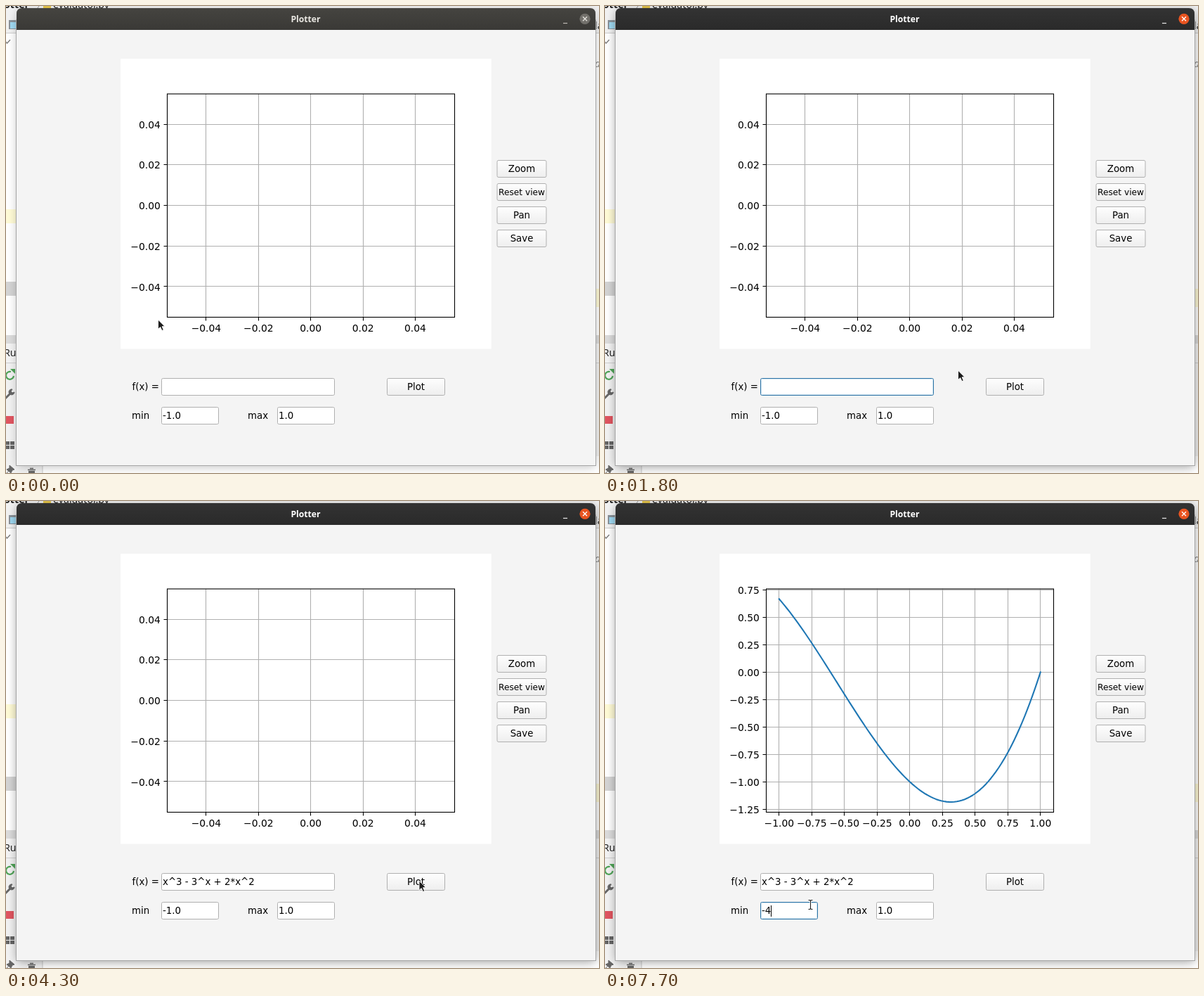
An HTML page for the animation above (8000 ms loop, 844 by 664 pixels).

```html
<!DOCTYPE html>
<html lang="en">
<head>
<meta charset="utf-8">
<title>Plotter</title>
<style>
  html, body { margin: 0; width: 100%; height: 100%; overflow: hidden; background: #f2f2f2; }
  svg { display: block; }
  text { font-family: "DejaVu Sans", sans-serif; font-size: 13.33px; fill: #000; white-space: pre; }
  .tick { font-size: 13.89px; }
  .ide { font-family: "Noto Sans", sans-serif; font-size: 14.2px; fill: #222; }
  .title { font-family: "Noto Sans", sans-serif; font-size: 12.2px; font-weight: bold; }
</style>
</head>
<body>
<svg id="stage" width="844" height="664" viewBox="0 0 844 664">
  <defs>
    <linearGradient id="btn" x2="0" y2="1">
      <stop stop-color="#fefefe"/><stop offset="1" stop-color="#eeeeee"/>
    </linearGradient>
    <linearGradient id="barIdle" x2="0" y2="1">
      <stop stop-color="#454440"/><stop offset="1" stop-color="#3a3936"/>
    </linearGradient>
    <linearGradient id="barActive" x2="0" y2="1">
      <stop stop-color="#333333"/><stop offset="1" stop-color="#2a2a2a"/>
    </linearGradient>
    <filter id="soft" x="-10%" y="-10%" width="120%" height="120%">
      <feGaussianBlur stdDeviation="7"/>
    </filter>
    <clipPath id="axes"><rect x="229" y="125" width="410" height="318"/></clipPath>
  </defs>
</svg>
<script>
const LOOP = 8000, STEP = 100;
const FORMULA = 'x^3 - 3^x + 2*x^2';
const stage = document.getElementById('stage');

function add(parent, tag, attrs, content) {
  const el = document.createElementNS('http://www.w3.org/2000/svg', tag);
  set(el, attrs);
  if (content !== undefined) el.textContent = content;
  parent.appendChild(el);
  return el;
}
function set(el, attrs) {
  for (const key in attrs) el.setAttribute(key, attrs[key]);
}
const group = (parent = stage) => add(parent, 'g', {});
const rect = (p, x, y, width, height, fill, more) =>
  add(p, 'rect', { x, y, width, height, fill, ...more });
const path = (p, d, stroke, more) => add(p, 'path', { d, stroke, fill: 'none', ...more });
const label = (p, x, y, str, more) => add(p, 'text', { x, y, ...more }, str);
const show = (el, on) => el.setAttribute('visibility', on ? 'visible' : 'hidden');
const snap = v => Math.floor(v) + 0.5;

// Editor showing around the window
function drawDesktop() {
  const g = group();
  rect(g, 0, 0, 844, 664, '#f2f2f2');
  label(g, 33, 3, 'plotter', { class: 'ide', 'text-anchor': 'end', 'font-weight': 'bold' });
  path(g, 'M43 -6l4 6-4 6', '#999');
  rect(g, 53, -8, 11, 11, '#e8c74a');
  label(g, 67, 3, 'evaluator.py', { class: 'ide' });
  rect(g, 4, 20, 14, 13, '#8a9299');
  rect(g, 6, 23, 12, 9, '#9fd9f2');
  rect(g, 0, 38, 844, 1, '#cfcfcf');
  rect(g, 0, 39, 844, 429, '#fff');
  path(g, 'M-1 50l2.5 3 4.5-5', '#777', { 'stroke-width': 1.3 });
  rect(g, 0, 289, 15, 20, '#fffbd6');
  rect(g, 0, 392, 15, 20, '#d4d4d4');
  rect(g, 839, 402, 5, 26, '#fffbd6');
  label(g, 838, 33, 'la', { class: 'ide' });
  label(g, 838, 87, 'd', { class: 'ide', 'font-style': 'italic', style: 'fill:#888' });
  rect(g, 0, 468, 844, 12, '#dcdcdc');
  rect(g, 0, 480, 844, 27, '#f4f4f4');
  label(g, -3, 498, 'Run', { class: 'ide' });
  rect(g, 0, 507, 844, 1, '#d0d0d0');
  path(g, 'M11 526a5.5 5.5 0 1 1-4-6', '#4fa457', { 'stroke-width': 2.2 });
  path(g, 'M6 516h7v7z', 'none', { fill: '#4fa457' });
  path(g, 'M-1 558l7-7', '#666', { 'stroke-width': 3 });
  path(g, 'M9 545a4 4 0 1 0 3 4l-3 1-2-2z', '#666', { fill: '#666' });
  rect(g, -1, 583, 12, 11, '#e05560');
  for (const x of [-1, 6]) for (const y of [619, 625]) rect(g, x, y, 6, 5, '#666');
  path(g, 'M5 653l7 6-3 1-2 4-6-5 4-2zM4 661l-4 4', '#666', { fill: '#666' });
  rect(g, 52, 640, 792, 24, '#fff');
  rect(g, 51.5, 640, 1, 24, '#ccc');
  path(g, 'M31 659.5h11M34 657.5h5', '#666', { 'stroke-width': 1.6 });
  rect(g, 32, 661, 9, 4, '#666');
}

function button(g, x, y, w, str, size) {
  const face = rect(g, x + 0.5, y + 0.5, w - 1, 24, 'url(#btn)', { rx: 2, stroke: '#b0b0b0' });
  label(g, x + w / 2, y + 17, str, { 'text-anchor': 'middle', style: size ? `font-size:${size}px` : '' });
  return face;
}

function field(g, x, y, w) {
  const frame = rect(g, x + 0.5, y + 0.5, w - 1, 24, '#fff', { rx: 2 });
  const glow = rect(g, x + 1.5, y + 1.5, w - 3, 22, 'none', { rx: 1.5, stroke: '#d5e8f3' });
  const text = label(g, x + 2, y + 17, '');
  const caret = rect(g, x + 2, y + 5, 1, 16, '#000');
  return {
    update(str, focus, caretOn, caretX) {
      if (text.textContent !== str) text.textContent = str;
      frame.setAttribute('stroke', focus ? '#2c73a5' : '#b0b0b0');
      show(glow, focus);
      show(caret, caretOn);
      if (caretOn) {
        const end = str ? text.getComputedTextLength() : 0;
        caret.setAttribute('x', caretX || Math.round(x + 2 + end));
      }
    }
  };
}

// Axes for one view: ticks are step * i, mapped to pixels by ox, sx, oy, sy
function drawAxes({ step, xi, yi, ox, sx, oy, sy, f }) {
  const g = group();
  const name = v => (v < 0 ? '\u2212' : '') + Math.abs(v).toFixed(2);
  let grid = '', ticks = '';
  for (let i = xi[0]; i <= xi[1]; i++) {
    const px = ox + sx * i * step, x = snap(px);
    grid += `M${x} 125V442`;
    ticks += `M${x} 442.5v5`;
    label(g, px, 463.3, name(i * step), { class: 'tick', 'text-anchor': 'middle' });
  }
  for (let i = yi[0]; i <= yi[1]; i++) {
    const py = oy - sy * i * step, y = snap(py);
    grid += `M229 ${y}H638`;
    ticks += `M229.5 ${y}h-5`;
    label(g, 219.8, py + 5.6, name(i * step), { class: 'tick', 'text-anchor': 'end' });
  }
  path(g, grid, '#b0b0b0', { 'stroke-width': 1.1 });
  path(g, ticks, '#000', { 'stroke-width': 1.1 });
  if (f) {
    let d = '';
    for (let i = 0; i <= 100; i++) {
      const x = -1 + i / 50;
      d += `${i ? 'L' : 'M'}${(ox + sx * x).toFixed(2)} ${(oy - sy * f(x)).toFixed(2)}`;
    }
    path(g, d, '#1f77b4', {
      'stroke-width': 2.08, 'stroke-linecap': 'square', 'stroke-linejoin': 'round', 'clip-path': 'url(#axes)'
    });
  }
  rect(g, 229.5, 125, 409, 317.5, 'none', { stroke: '#000', 'stroke-width': 1.1 });
  return g;
}

drawDesktop();
const shadow = rect(stage, 15, 6, 825, 650, '#000', { rx: 8, filter: 'url(#soft)' });
const win = group();
rect(win, 14.5, 20, 825, 633.5, '#f4f4f4', { stroke: '#a5a5a5' });
const bar = path(win, 'M15 34V11q0-8 8-8H831q8 0 8 8V34z', 'none');
const title = label(win, 426.5, 23, 'Plotter', { class: 'title', 'text-anchor': 'middle' });
const minimize = path(win, 'M793 24.5h6', '#fff', { 'stroke-width': 1.2 });
const close = add(win, 'circle', { cx: 824, cy: 18.3, r: 7.6 });
const cross = path(win, 'M821 15.3l6 6m0-6l-6 6', '#fff', { 'stroke-width': 1.3 });

rect(win, 163, 75, 527.7, 412.6, '#fff');
const emptyView = drawAxes({ step: 0.02, xi: [-2, 2], yi: [-2, 2], ox: 433.7, sx: 3720, oy: 283.5, sy: 2887 });
const curveView = drawAxes({
  step: 0.25, xi: [-4, 4], yi: [-5, 3], ox: 433.8, sx: 186, oy: 243.3, sy: 156,
  f: x => x ** 3 - 3 ** x + 2 * x * x
});

const form = group();
['Zoom', 'Reset view', 'Pan', 'Save'].forEach((str, i) =>
  button(form, 698.5, 219 + 33 * i, 71, str, i === 1 ? 12.2 : 0));
const plotFace = button(form, 542, 529, 83, 'Plot');
label(form, 179.5, 546, 'f(x) =');
label(form, 179, 587, 'min');
label(form, 344, 587, 'max');
const formula = field(form, 221, 529, 247);
const minimum = field(form, 221, 570, 82);
const maximum = field(form, 386, 570, 82);
maximum.update('1.0', false, false);

const arrow = path(stage, 'M0 0V13.5L3.2 10.6 5.5 15.5 7.8 14.5 5.6 9.7H9.6Z', '#fff',
  { fill: '#1c1c1c', 'stroke-width': 0.9 });
const beam = group();
for (const [color, width] of [['#fff', 2.6], ['#222', 1.1]])
  path(beam, 'M-3 -6.5H-1L0 -5.5 1 -6.5H3M0 -5.5V5.5M-3 6.5H-1L0 5.5 1 6.5H3', color, { 'stroke-width': width });

// Pointer route: time, x, y
const route = [
  [200, 216.5, 446], [800, 277.5, 550], [1300, 277.5, 550], [1900, 520.5, 515.5], [2600, 520.5, 515.5],
  [2700, 537.5, 523], [3500, 587.8, 537], [3900, 588, 540], [5700, 588, 540], [6300, 292.5, 574]
];
function pointerAt(t) {
  if (t <= route[0][0]) return route[0].slice(1);
  for (let i = 1; i < route.length; i++) {
    const [t0, x0, y0] = route[i - 1], [t1, x1, y1] = route[i];
    if (t <= t1) {
      const p = (t - t0) / (t1 - t0), e = p * p * (3 - 2 * p);
      return [x0 + (x1 - x0) * e, y0 + (y1 - y0) * e];
    }
  }
  return route[route.length - 1].slice(1);
}

const edits = [[0, '-1.0'], [7000, '-1.'], [7200, '-1'], [7500, '-'], [7700, '-4']];
const within = (t, ...spans) => spans.some(([a, b]) => t >= a && t < b);
const inside = (x, y, l, top, r, b) => x >= l && x <= r && y >= top && y <= b;

function render(now) {
  // The screen refreshes ten times a second
  const t = Math.floor((now % LOOP) / STEP) * STEP;

  const active = t >= 1000;
  shadow.setAttribute('opacity', active ? 0.36 : 0.22);
  bar.setAttribute('fill', active ? 'url(#barActive)' : 'url(#barIdle)');
  title.style.fill = active ? '#ffffff' : '#e9e7e2';
  minimize.setAttribute('stroke', active ? '#e8e8e8' : '#bdbab4');
  close.setAttribute('fill', active ? '#e95420' : '#72706b');
  cross.setAttribute('stroke', active ? '#fff' : '#e4e2dd');

  const plotted = t >= 4900;
  show(emptyView, !plotted);
  show(curveView, plotted);

  const pasted = t >= 2100;
  formula.update(pasted ? FORMULA : '', within(t, [1000, 4100]),
    within(t, [1000, 1600], [2100, 2800], [3300, 3900]), pasted ? 353 : 223);
  const typed = edits.filter(e => e[0] <= t).pop()[1];
  minimum.update(typed, t >= 6500, t >= 6500);

  const pressed = within(t, [4100, 4300]);
  set(plotFace, { fill: pressed ? '#d9d9d9' : 'url(#btn)' });

  const [x, y] = pointerAt(t);
  const overField = inside(x, y, 221, 529, 468, 554) || inside(x, y, 221, 570, 303, 595) ||
    inside(x, y, 386, 570, 468, 595);
  show(arrow, !overField);
  show(beam, overField);
  const place = `translate(${x.toFixed(1)} ${y.toFixed(1)})`;
  arrow.setAttribute('transform', place);
  beam.setAttribute('transform', place);
}

let start;
function tick(now) {
  if (start === undefined) start = now;
  render(now - start);
  requestAnimationFrame(tick);
}
render(0);
requestAnimationFrame(tick);
</script>
</body>
</html>
```
